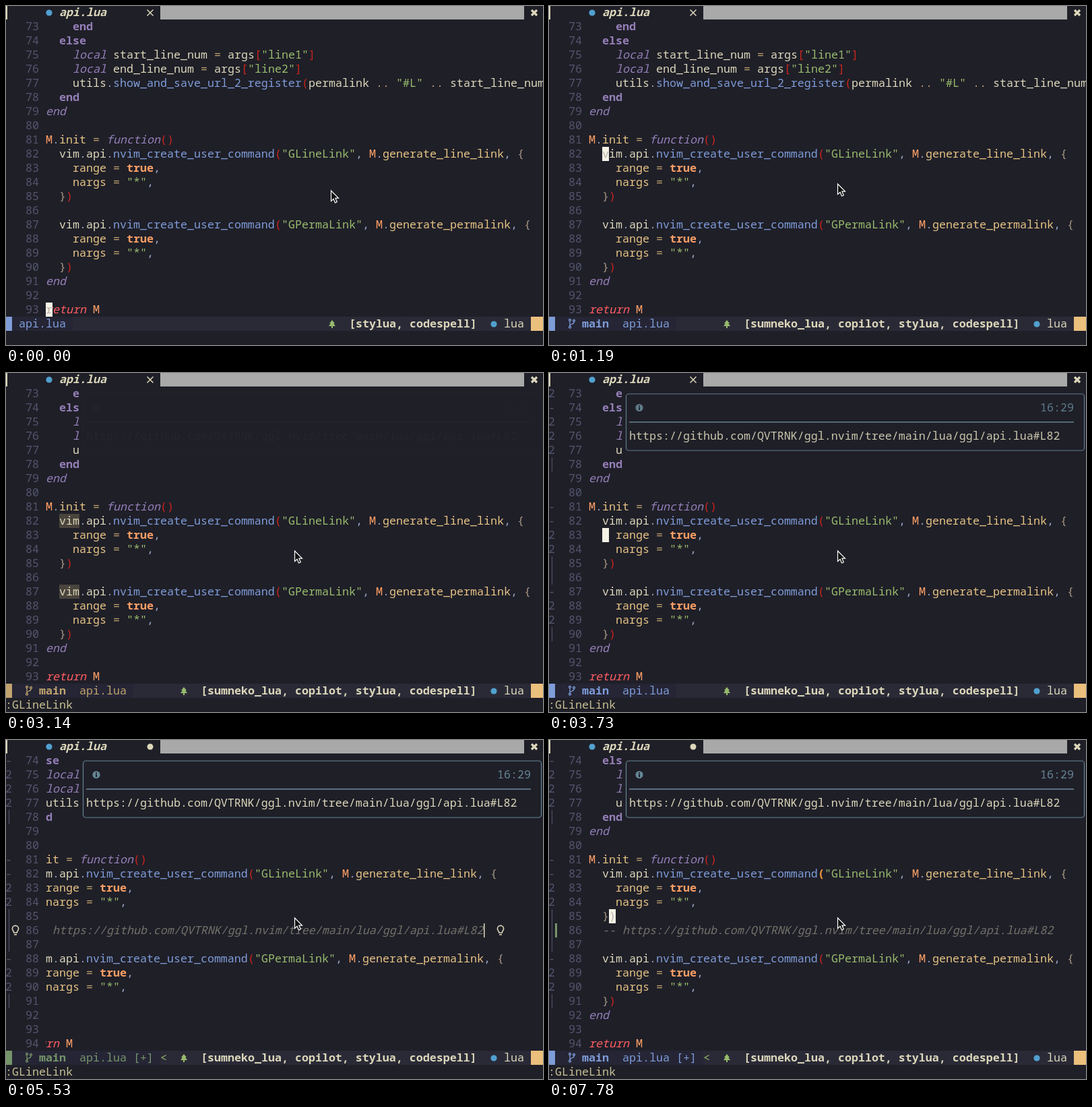
Recreate the animation shown at these times as an HTML page with a canvas. Size 797 by 503 pixels, loop 8000 ms.

```html
<!DOCTYPE html>
<html lang="en">
<head>
<meta charset="utf-8">
<title>Editor session</title>
<style>
  html, body { margin: 0; width: 100%; height: 100%; overflow: hidden; background: #1f1f28; }
  canvas { display: block; }
</style>
</head>
<body>
<canvas id="stage" width="797" height="503"></canvas>
<script>
const ctx = document.getElementById('stage').getContext('2d');
const LOOP = 8000, CELL = 10, ROW = 21;

const C = {
  bg: '#1f1f28', fg: '#dcd7ba', dim: '#54546d', comment: '#727169', violet: '#957fb8',
  green: '#98bb6c', tan: '#c0a36e', blue: '#7e9cd8', yellow: '#e6c384', orange: '#ffa066',
  red: '#cc241d', rose: '#ff5d62', brace: '#a89984', punct: '#9cabca', info: '#658594',
  icon: '#51a0cf', status: '#2a2a37', section: '#252535', sign: '#76946a', block: '#f6f2e6'
};
const MODE_COLOR = { normal: C.blue, command: C.tan, insert: C.sign };

const URL_TEXT = 'https://github.com/QVTRNK/ggl.nvim/tree/main/lua/ggl/api.lua#L82';
const COMMAND = ':GLineLink';
const CODE = `    end
  else
    local start_line_num = args["line1"]
    local end_line_num = args["line2"]
    utils.show_and_save_url_2_register(permalink .. "#L" .. start_line_num
  end
end

M.init = function()
  vim.api.nvim_create_user_command("GLineLink", M.generate_line_link, {
    range = true,
    nargs = "*",
  })

  vim.api.nvim_create_user_command("GPermaLink", M.generate_permalink, {
    range = true,
    nargs = "*",
  })
end

return M`.split('\n');
const FOLDS = '2-222│  --22││-22│   ';
const FIRST_LINE = 73, NEW_LINE = 86;

const SNIPPETS = ['do .. end~', 'elseif .. then~', 'for .. ipairs~', 'for .. pairs~', 'for i = ..~',
  'function ()~', 'if .. then~', 'in ..~', 'local function~', 'repeat .. until~'];
const COMMANDS = ['GLineLink', 'GPermaLink', 'Gitsigns', 'Git', 'Gdiffsplit'];

// Each entry changes part of the editor state from its time on.
const TIMELINE = [
  [0, { mode: 'normal', cursor: [93, 0], mouse: [482, 274], cmd: '', scroll: 0 }],
  [300, { cursor: [91, 0], mouse: [468, 271] }],
  [445, { cursor: [86, 0], mouse: [444, 267] }],
  [590, { cursor: [82, 2], mouse: [428, 264] }],
  [1190, { attached: true }],
  [1790, { mode: 'command', cmd: ':' }],
  [2240, { cmd: ':G', references: true }],
  [2390, { cmd: ':GL', commandMenu: true }],
  [2540, { cmd: COMMAND }],
  [2840, { commandMenu: false, entered: true }],
  [3140, { notice: true }],
  [3290, { mode: 'normal', folds: true }],
  [3580, { references: false }],
  [3730, { cursor: [83, 2] }],
  [3880, { cursor: [84, 2] }],
  [4030, { cursor: [85, 2] }],
  [4180, { mode: 'insert', edited: true, comment: '  ', cursor: [86, 2] }],
  [4330, { sign: true }],
  [4780, { comment: '  -', cursor: [86, 3], modified: true }],
  [4930, { comment: '  --', cursor: [86, 4], bulb: true, snippetMenu: true }],
  [5080, { comment: '  -- ', cursor: [86, 5], snippetMenu: false }],
  [5530, { comment: '  -- ' + URL_TEXT, cursor: [86, 69], scroll: 4 }],
  [6130, { bulb: false }],
  [6580, { mode: 'normal', cursor: [86, 68] }],
  [7780, { cursor: [85, 3], scroll: 0, matchParen: true }]
];

const stateAt = time =>
  Object.assign({}, ...TIMELINE.filter(([start]) => start <= time).map(([, change]) => change));

const colX = col => col * CELL - 1;
const rowY = row => row * ROW - 1;

function rect(x, y, w, h, color) {
  ctx.fillStyle = color;
  ctx.fillRect(x, y, w, h);
}

function cells(col, row, cols, rows, color) {
  rect(colX(col), rowY(row), cols * CELL, rows * ROW, color);
}

function text(str, col, row, color, style = '') {
  ctx.font = `${style} 16.667px "Noto Sans Mono", "DejaVu Sans Mono", monospace`;
  ctx.fillStyle = color;
  ctx.fillText(str, colX(col), row * ROW + 15);
}

function disc(x, y, r, color) {
  ctx.fillStyle = color;
  ctx.beginPath();
  ctx.arc(x, y, r, 0, 7);
  ctx.fill();
}

function path(d, x, y, { fill, stroke, width = 1.4 }) {
  const shape = new Path2D(d);
  ctx.save();
  ctx.translate(x, y);
  if (fill) { ctx.fillStyle = fill; ctx.fill(shape); }
  if (stroke) { ctx.strokeStyle = stroke; ctx.lineWidth = width; ctx.stroke(shape); }
  ctx.restore();
}

function cross(x, y, r, color, width) {
  path(`M${-r} ${-r}L${r} ${r}M${r} ${-r}L${-r} ${r}`, x, y, { stroke: color, width });
}

// Bordered float; the border runs through the middle of the outer cells.
function frame(col, row, cols, rows, color) {
  cells(col, row, cols, rows, C.bg);
  ctx.strokeStyle = color;
  ctx.lineWidth = 1.2;
  ctx.beginPath();
  ctx.roundRect(colX(col) + 5.5, rowY(row) + 11, (cols - 1) * CELL, (rows - 1) * ROW, 4);
  ctx.stroke();
}

function tokenStyle(token, indented) {
  if (token[0] === '"') return [C.green];
  if (/^(end|else)$/.test(token)) return [C.violet, indented ? 'bold' : 'italic'];
  if (/^(local|function)$/.test(token)) return [C.violet, 'italic'];
  if (token === 'return') return [C.rose, 'italic'];
  if (token === 'true') return [C.orange, 'bold'];
  if (token === 'M') return [C.orange];
  if (/^(nvim_|show_)/.test(token)) return [C.blue];
  if (/^(generate_|init$|range$|nargs$)/.test(token)) return [C.yellow];
  if (/^(=|\.\.)$/.test(token)) return [C.tan];
  if (/^[()[\]]/.test(token)) return [C.red];
  if (/^[{}]/.test(token)) return [C.brace];
  if (/^[.,]$/.test(token)) return [C.punct];
  return [C.fg];
}

function codeLine(line, row) {
  if (/^\s*-/.test(line)) return text(line, 6, row, C.comment, 'italic');
  for (const match of line.matchAll(/"[^"]*"|\w+|\.\.|[^\s\w]/g)) {
    const [color, style] = tokenStyle(match[0], line[0] === ' ');
    text(match[0], 6 + match.index, row, color, style);
  }
}

function drawBulb(x, y) {
  path('M-2.2 4C-2.2 1.5-4.6 1-4.6-2A4.6 4.6 0 0 1 4.6-2C4.6 1 2.2 1.5 2.2 4ZM-2 6.8H2',
    x, y, { stroke: C.fg, width: 1.6 });
}

function drawTabline(s) {
  rect(0, 0, 2, 20, C.fg);
  disc(64, 10, 4.6, C.icon);
  text('api.lua', 8, 0, C.fg, 'italic bold');
  if (s.edited) disc(214, 10, 4.5, C.fg);
  else cross(214, 10, 4.5, C.fg, 1.5);
  rect(229, 0, 540, 20, '#a9a9a9');
  cross(784, 10, 4, C.fg, 3.2);
}

function drawBuffer(s) {
  const lines = [...CODE], folds = [...FOLDS];
  if (s.edited) {
    lines.splice(NEW_LINE - FIRST_LINE, 0, s.comment);
    folds.splice(NEW_LINE - FIRST_LINE, 0, '│');
  }
  const top = FIRST_LINE + (s.edited ? 1 : 0);
  const rowOf = number => number - top + 1;

  ctx.save();
  ctx.beginPath();
  ctx.rect(59, 20, 738, 441);
  ctx.clip();
  ctx.translate(-s.scroll * CELL, 0);
  if (s.references) for (const number of [82, 87]) cells(8, rowOf(number), 3, 1, '#49443c');
  for (let row = 1; row <= 21; row++) codeLine(lines[row - 1 + top - FIRST_LINE], row);
  if (s.matchParen) {
    cells(40, rowOf(82), 1, 1, C.bg);
    text('(', 40, rowOf(82), '#ff9e3b', 'bold');
  }
  const [number, column] = s.cursor, cursorRow = rowOf(number);
  if (s.mode === 'normal') {
    cells(6 + column, cursorRow, 1, 1, C.block);
    text(lines[number - FIRST_LINE][column] || '', 6 + column, cursorRow, '#b9b5ad');
  } else if (s.mode === 'insert') {
    rect(colX(6 + column), rowY(cursorRow), 1.5, ROW, C.fg);
  }
  if (s.bulb) drawBulb(colX(8 + column) + 5, rowY(cursorRow) + 10);
  ctx.restore();

  for (let row = 1; row <= 21; row++) {
    const current = row - 1 + top;
    text(String(current), 3, row, C.dim);
    const fold = folds[current - FIRST_LINE];
    if (!s.folds) continue;
    if (fold === '│') rect(4, rowY(row), 1, ROW, C.dim);
    else text(fold, 0, row, C.dim);
  }
  if (s.bulb) drawBulb(14, rowY(rowOf(NEW_LINE)) + 10);
  else if (s.sign) rect(9, rowY(rowOf(NEW_LINE)), 3, ROW, C.sign);
}

function drawNotice(alpha) {
  cells(11, 1, 69, 5, C.bg);
  ctx.save();
  ctx.globalAlpha = alpha;
  frame(11, 1, 69, 5, C.info);
  disc(134, 51.5, 5.6, C.info);
  rect(133, 48, 2, 1.6, C.bg);
  rect(133, 50.5, 2, 4.5, C.bg);
  text('16:29', 73, 2, C.info);
  rect(119, 72, 660, 1.6, C.info);
  text(URL_TEXT, 12, 4, C.fg);
  ctx.restore();
}

function drawSnippetMenu() {
  frame(8, 1, 33, 12, C.fg);
  SNIPPETS.forEach((label, i) => {
    const row = i + 2, y = rowY(row) + 11;
    path('M5-4L-2 2M5 4L-2-2M-5-3a1.6 1.6 0 1 0 3.2 0a1.6 1.6 0 1 0-3.2 0M-5 3a1.6 1.6 0 1 0 3.2 0a1.6 1.6 0 1 0-3.2 0',
      104, y, { stroke: '#7fb4ca', width: 1.2 });
    text(label, 13, row, C.fg);
    text('(LSP)', 34, row, C.comment);
  });
  cells(40, 2, 1, 1, '#2d4f67');
}

function drawStatus(s) {
  const color = MODE_COLOR[s.mode], start = s.attached ? 11 : 2;
  cells(0, 22, 80, 1, C.status);
  cells(0, 22, s.modified ? 23 : start + 8, 1, C.section);
  cells(0, 22, 1, 1, color);
  text('api.lua' + (s.modified ? ' [+]' : ''), start, 22, color);
  if (s.modified) text('<', 23, 22, C.green);
  if (s.attached) {
    path('M-3-3V4M3-2C3 2-3 0-3 4M-4.5-5a1.5 1.5 0 1 0 3 0a1.5 1.5 0 1 0-3 0M1.5-4a1.5 1.5 0 1 0 3 0a1.5 1.5 0 1 0-3 0M-4.5 5.5a1.5 1.5 0 1 0 3 0a1.5 1.5 0 1 0-3 0',
      34, 471, { stroke: color, width: 1.3 });
    text('main', 5, 22, color, 'bold');
  }
  path('M0-6L4-1H2.2L5 3H1V6H-1V3H-5L-2.2-1H-4Z', s.attached ? 264 : 484, 472, { fill: C.green });
  if (s.attached) text('[sumneko_lua, copilot, stylua, codespell]', 29, 22, C.fg, 'bold');
  else text('[stylua, codespell]', 51, 22, C.fg, 'bold');
  disc(724, 472, 4.6, C.icon);
  text('lua', 74, 22, C.fg);
  cells(78, 22, 2, 1, '#ebbf7c');
}

function drawCommandLine(s) {
  text(s.cmd, 0, 23, '#c8c093');
  if (s.mode === 'command' && !s.entered) cells(s.cmd.length, 23, 1, 1, C.block);
  if (s.commandMenu) {
    frame(0, 16, 20, 7, C.fg);
    COMMANDS.forEach((label, i) => text(label, 2, 17 + i, C.fg));
  }
}

function drawMouse([x, y]) {
  path('M0 0V15.5L3.6 12.2L6 18L8.8 16.8L6.4 11.2H11Z', x + 0.5, y, { fill: '#111', stroke: '#fff', width: 1.2 });
}

function render(time) {
  const s = stateAt(time);
  rect(0, 0, 797, 503, C.bg);
  drawTabline(s);
  drawBuffer(s);
  if (s.notice) {
    const lastChange = TIMELINE.filter(([start]) => start <= time).pop()[0];
    const age = Math.max(0, (time < 3580 ? Math.max(lastChange, 3140 + 150 * Math.floor((time - 3140) / 150)) : time) - 3140);
    drawNotice(Math.max(0.03, 1 - Math.exp(-age / 250)));
  }
  if (s.snippetMenu) drawSnippetMenu();
  drawStatus(s);
  drawCommandLine(s);
  drawMouse(s.mouse);
}

function tick() {
  render(performance.now() % LOOP);
  requestAnimationFrame(tick);
}
tick();
</script>
</body>
</html>
```
